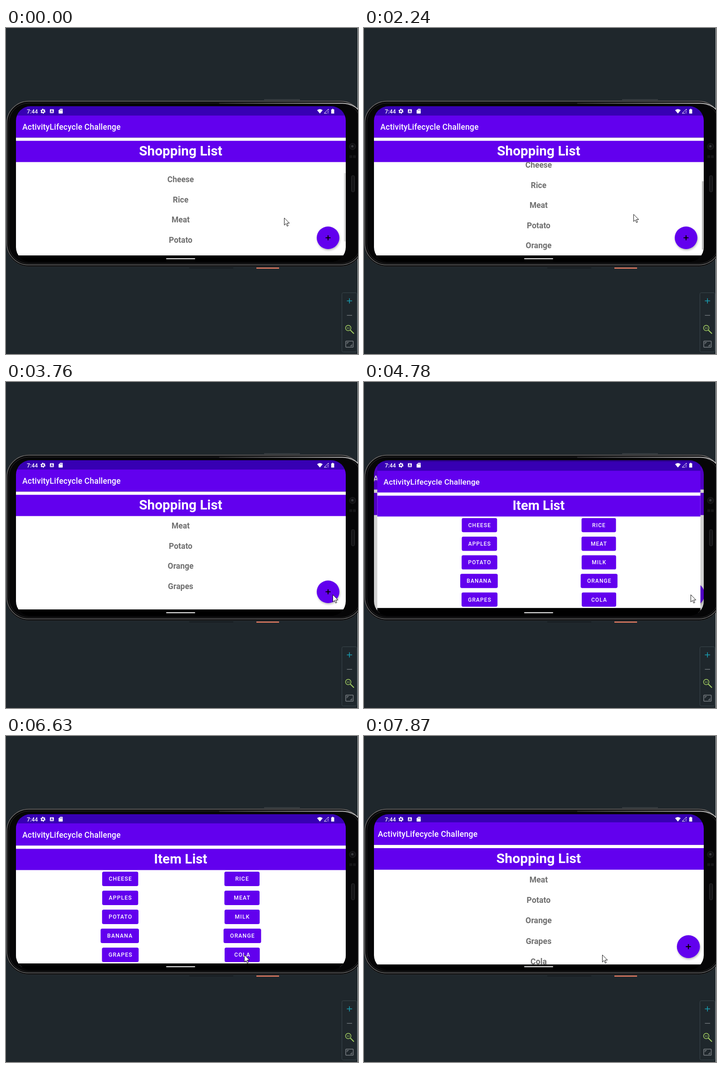
Write an HTML page that moves like this. It is 776 px wide and 721 px high and loops after 7990 ms.

```html
<!DOCTYPE html>
<html lang="en">
<head>
<meta charset="utf-8">
<title>Shopping list demo</title>
<style>
  html, body { margin: 0; width: 100%; height: 100%; overflow: hidden; background: #1f272c; }
  svg { display: block; width: 776px; height: 721px; }
  text { font-family: Roboto, "Open Sans", sans-serif; }
  .bar { font-size: 17.5px; font-weight: 500; letter-spacing: .0125em; fill: #fff; }
  .head { font-size: 29.75px; font-weight: 700; fill: #fff; text-anchor: middle; }
  .item { font-size: 17.5px; font-weight: 700; fill: #707070; text-anchor: middle; }
  .btn { font-size: 12.25px; font-weight: 500; letter-spacing: .0893em; fill: #fff; text-anchor: middle; }
  .clock { font-size: 12.25px; font-weight: 500; fill: #fff; }
</style>
</head>
<body>
<svg viewBox="0 0 776 721" xmlns="http://www.w3.org/2000/svg">
  <defs>
    <clipPath id="screenClip"><rect x="22" y="173" width="727" height="344" rx="32"/></clipPath>
    <clipPath id="listClip"><rect x="22" y="296.5" width="727" height="206.5"/></clipPath>
    <clipPath id="colaClip"><rect x="482" y="468" width="77.5" height="32" rx="3.5"/></clipPath>
    <linearGradient id="shine">
      <stop offset="0" stop-color="#333"/><stop offset=".6" stop-color="#8c8c8c"/><stop offset="1" stop-color="#ccc"/>
    </linearGradient>
    <filter id="lift" x="-30%" y="-30%" width="160%" height="170%">
      <feDropShadow dx="1" dy="2.5" stdDeviation="2" flood-color="#000" flood-opacity=".28"/>
    </filter>
  </defs>

  <rect width="776" height="721" fill="#1f272c"/>
  <rect x="775" width="1" height="721" fill="#c4c6c8"/>

  <g id="phone" fill="none">
    <path d="M569 158.500H648" stroke="#44484b" stroke-width="1.500"/>
    <path d="M404 530.500H501" stroke="#12171a" stroke-width="1.600"/>
    <path d="M552 531H602" stroke="#ea7d62" stroke-width="2.400"/>
    <rect x=".5" y="160.500" width="787" height="367" rx="50" fill="#060607" stroke="#2c2e30"/>
    <rect x="2" y="162" width="784" height="362" rx="48" stroke="#707070" stroke-width="1.500"/>
    <rect x="6" y="166" width="776" height="355" rx="44" stroke="#303030"/>
    <path d="M470 166.500H742Q766 167 780 184" stroke="url(#shine)" stroke-width="1.800"/>
    <circle cx="764" cy="262" r="7" fill="#111113" stroke="#222224"/>
    <circle cx="763.500" cy="261.500" r="2.500" fill="#3a3b3f"/>
    <path d="M757 284.500H771" stroke="#151517" stroke-width="6" stroke-dasharray="6 2"/>
    <rect x="761.500" y="326.500" width="7" height="36" rx="3" fill="#151517" stroke="#303032"/>
  </g>

  <g clip-path="url(#screenClip)">
    <rect x="22" y="173" width="727" height="344" fill="#000"/>
    <g id="listWin"></g>
    <rect id="dim" x="22" y="173" width="727" height="344"/>
    <g id="itemWin"></g>
    <g id="system" fill="#fff">
      <text class="clock" x="46" y="188.500">7:44</text>
      <circle cx="81.500" cy="184" r="3" fill="none" stroke="#fff" stroke-width="2.200"/>
      <circle cx="81.500" cy="184" r="4.600" fill="none" stroke="#fff" stroke-width="1.800" stroke-dasharray="2.600 2.217"/>
      <rect x="96.800" y="179.700" width="8.600" height="8.600" rx="1"/>
      <path d="M98.900 187L101.100 181.500L103.300 187M99.700 185.300H102.500" fill="none" stroke="#3700b3" stroke-width="1.100"/>
      <path d="M119.500 178.800H124Q125 178.800 125 179.800V188.200Q125 189.200 124 189.200H117Q116 189.200 116 188.200V182.300Z"/>
      <path d="M119.300 180.500V182.500M121.300 180.500V182.500M123.300 180.500V182.500" stroke="#3700b3" stroke-width=".9"/>
      <path d="M685.800 181.800Q692 176.800 698.200 181.800L692 189.300Z"/>
      <path d="M701.500 188.600L710.800 179.300V182M701.500 188.600H707.500" fill="none" stroke="#fff"/>
      <path d="M710 183.500V186.700M710 187.800V189" stroke="#fff" stroke-width="1.200"/>
      <path d="M717 180H719V178.700H721.500V180H723.500V189.300H717Z"/>
      <rect x="353" y="509.300" width="64" height="2" rx="1"/>
    </g>
  </g>

  <g id="tools" fill="none" stroke-width="1.500">
    <rect x="740.500" y="585.500" width="33" height="131" rx="3" fill="#1f272c" stroke="#3a464c" stroke-width="1"/>
    <path d="M751.500 603.500H763M757.200 597.800V609.200" stroke="#19a3b8"/>
    <path d="M751.500 635.500H763" stroke="#7b8185" stroke-width="1.300"/>
    <circle cx="754.500" cy="663.500" r="6" stroke="#a3cf62"/>
    <path d="M759 668L767 676" stroke="#a3cf62" stroke-width="2.200"/>
    <path d="M752.500 661.500V666M756.500 661.500V666M754.500 662.300V663.300M754.500 664.800V665.800" stroke="#a3cf62" stroke-width=".8"/>
    <rect x="749" y="692.500" width="16.500" height="13.500" rx="1" stroke="#7b8185"/>
    <path d="M752 699V695.500H755.500M762.500 699.500V703H759" stroke="#7b8185" stroke-width="1.300"/>
  </g>

  <path id="cursor" d="M0 0V16L3.700 12.600L6.300 18.400L8.700 17.300L6.200 11.600H11.300Z" fill="#fff" stroke="#111"/>
</svg>

<script>
const LOOP = 7990, TICK = 120, LEFT = 22, WIDTH = 727, CX = 385, CY = 345;
const OPEN = 4540, CLOSE = 7870, PRESS = 7470;
const $ = id => document.getElementById(id);
const set = (el, attrs) => { for (const k in attrs) el.setAttribute(k, attrs[k]); };
const clamp = (v, lo, hi) => Math.min(hi, Math.max(lo, v));
const band = (y, h, fill) => `<rect x="${LEFT}" y="${y}" width="${WIDTH}" height="${h}" fill="${fill}"/>`;
const label = (cls, x, y, s) => `<text class="${cls}" x="${x}" y="${y}">${s}</text>`;

const frame = (title, content) =>
  band(173, 20.5, '#3700b3') + band(193.3, 49.2, '#6200ee') + band(242.5, 260.5, '#fff') +
  band(249.5, 47, '#6200ee') + band(503, 14, '#000') +
  label('bar', 36, 225, 'ActivityLifecycle Challenge') + label('head', CX, 282, title) + content;

const goods = ['Cheese', 'Rice', 'Meat', 'Potato', 'Orange', 'Grapes', 'Cola'];
$('listWin').innerHTML = frame('Shopping List', `
  <g clip-path="url(#listClip)">
    <g id="rows">${goods.map((s, i) => label('item', CX, 341 + i * 44.6, s)).join('')}</g>
    <rect id="thumb" x="745" width="3.5" height="151" fill="#b9b9b9"/></g>
  <circle cx="710" cy="464" r="25" fill="#6200ee" filter="url(#lift)"/>
  <circle id="fabRipple" cx="710" cy="464" r="25" fill="#fff"/>
  <path d="M704.500 464H715.500M710 458.500V469.500" stroke="#000" stroke-width="2.100"/>`);
const cola = $('rows').lastElementChild;

const pairs = ['CHEESE RICE', 'APPLES MEAT', 'POTATO MILK', 'BANANA ORANGE', 'GRAPES COLA'];
$('itemWin').innerHTML = frame('Item List',
  pairs.map(p => '<g class="pair">' + p.split(' ').map(s =>
    '<rect height="32" rx="3.5" fill="#6200ee"/>' + label('btn', 0, 0, s)).join('') + '</g>').join('') +
  '<g clip-path="url(#colaClip)"><circle id="ripple" cx="525" cy="484" fill="#fff" opacity=".22"/></g>');

// Two buttons per row, with equal space before, between and after them
document.querySelectorAll('.pair').forEach((row, i) => {
  const texts = [...row.querySelectorAll('text')];
  const widths = texts.map(el => Math.max(77.5, el.getComputedTextLength() + 28));
  const gap = (WIDTH - widths[0] - widths[1]) / 3;
  let x = LEFT + gap;
  texts.forEach((el, j) => {
    const y = 300 + i * 42;
    set(el.previousSibling, { x, y, width: widths[j] });
    set(el, { x: x + widths[j] / 2 + .5, y: y + 20.4 });
    x += widths[j] + gap;
  });
});

// Pointer moves: start, ticks, dx, dy
const moves = [
  [650, 4, -7, 26.5], [1260, 3, -3, 17.5], [1760, 1, -.5, -4],
  [1880, 9, -19.5, -108], [3640, 2, 137, 118.5], [6120, 5, -195, 13.5]
];
function pointer(t) {
  let x = 613.5, y = 420;
  for (const [start, ticks, dx, dy] of moves) {
    const p = clamp((Math.floor((t - start) / TICK) + 1) / ticks, 0, 1);
    x += dx * p;
    y += dy * p;
  }
  return `translate(${x} ${y})`;
}
const zoom = k => `translate(${CX + .5} ${CY}) scale(${k}) translate(${-CX - .5} ${-CY})`;
const during = (t, from, to) => t >= from && t < to;

function draw() {
  const t = performance.now() % LOOP;
  const scroll = clamp(8 + Math.floor((t - 2000) / TICK) * 12, 0, 106);
  const closed = t >= CLOSE;
  const age = Math.max(0, t - OPEN);
  const push = closed ? 0 : 1 - Math.exp(-age / 100);
  const back = closed ? .016 * Math.exp((CLOSE - t) / TICK) : 0;

  set($('cursor'), { transform: pointer(t) });
  set($('rows'), { transform: `translate(0 ${-scroll})` });
  set($('thumb'), {
    y: 321 + Math.min(31, scroll * .5625),
    opacity: t < 150 ? .55 : +during(t, 2000, 3640)
  });
  set($('listWin'), { transform: zoom(1 + .05 * push + back) });
  set($('dim'), { opacity: .2 * push });
  set($('itemWin'), {
    transform: zoom(1 - .15 * Math.exp(-age / TICK)),
    opacity: closed ? 0 : clamp(age / TICK, 0, 1)
  });
  set($('fabRipple'), { opacity: during(t, 4420, 4780) ? .22 : 0 });
  set($('ripple'), { r: during(t, PRESS, CLOSE) ? 18 + (t - PRESS) / 4 : 0 });
  cola.setAttribute('visibility', closed ? 'visible' : 'hidden');
  requestAnimationFrame(draw);
}
draw();
</script>
</body>
</html>
```
